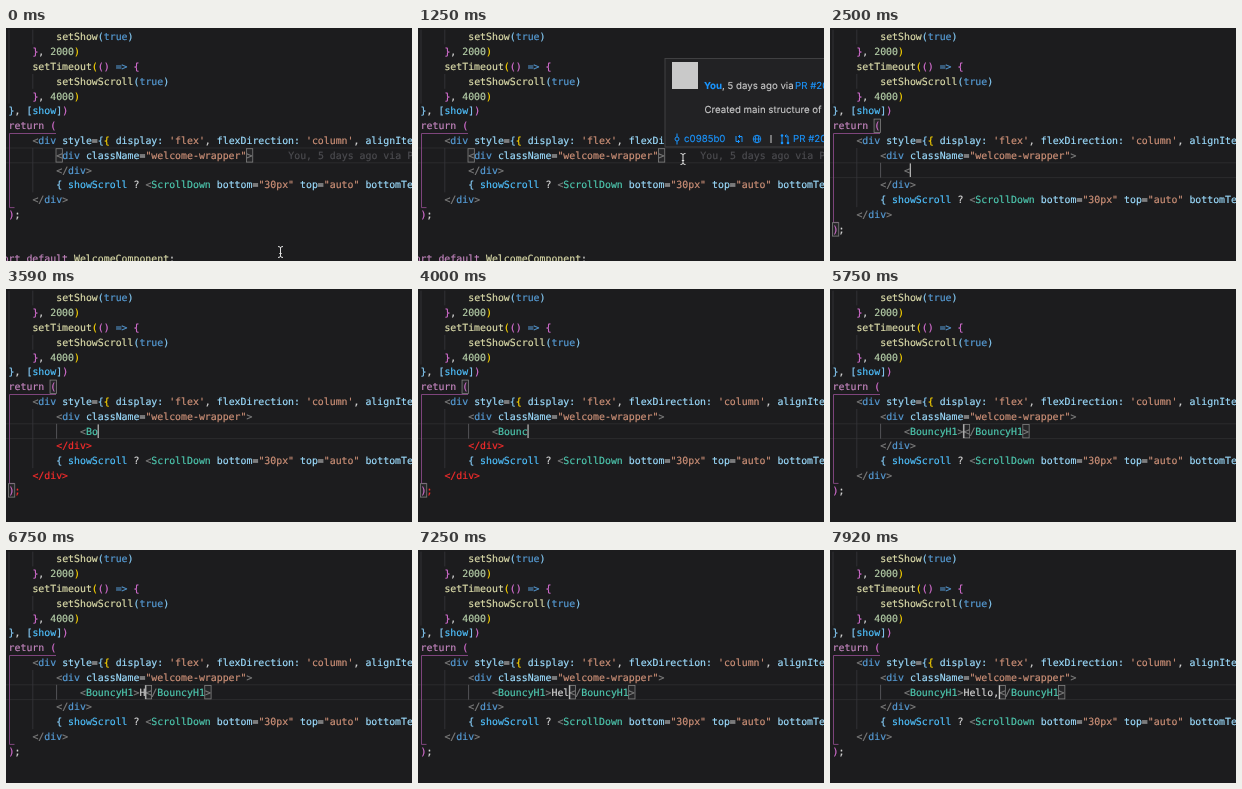
Recreate the animation shown at these times as an HTML page. Size 406 by 233 pixels, loop 8 s.

```html
<!DOCTYPE html>
<html lang="en">
<head>
<meta charset="utf-8">
<title>Editor</title>
<style>
  html, body { margin: 0; width: 100%; height: 100%; overflow: hidden; background: #1c1c1e; }
  svg { display: block; width: 100vw; height: 100vh; }
  text {
    white-space: pre; text-rendering: geometricPrecision; font: 9.88px "DejaVu Sans Mono", monospace;
    fill: currentColor; stroke: currentColor; stroke-width: .18px;
  }
  tspan { fill: currentColor; stroke: currentColor; }
  .ui text { font: 9.7px Inter, sans-serif; stroke-width: .1px; }
  .bold, .ui .bold { font-weight: 700; }
</style>
</head>
<body>
<svg viewBox="0 0 406 233" preserveAspectRatio="none">
  <g id="scene"></g>
  <path id="mouse" d="M-2.5-5.5Q0-5.5 0-4Q0-5.5 2.5-5.5M0-4V4M-2.5 5.5Q0 5.5 0 4Q0 5.5 2.5 5.5M-1.2 1.5H1.2" fill="none" stroke="#e0e0e0"/>
</svg>
<script>
const LOOP = 8000, CHAR = 5.95, ROW = 14.8, LEFT = 2.6;
const COLORS = {
  y: '#dcdcaa', b: '#569cd6', n: '#b5cea8', v: '#9cdcfe', s: '#87cefa', o: '#da70d6', g: '#ffd700',
  w: '#d4d4d4', k: '#c586c0', t: '#808080', c: '#4ec9b0', q: '#ce9178', r: '#f82c2c', d: '#4c4c50',
  i: '#4fc1ff',
};

// Each step: start time, text typed on the new line.
const TYPING = [
  [1750, ''], [2250, '<'], [3170, '<B'], [3420, '<Bo'], [3670, '<Bou'], [3840, '<Boun'],
  [4000, '<Bounc'], [4170, '<Bouncy'], [5090, '<BouncyH1'], [5590, '<BouncyH1>'],
  [6500, '<BouncyH1>H'], [7000, '<BouncyH1>He'], [7170, '<BouncyH1>Hel'],
  [7340, '<BouncyH1>Hell'], [7590, '<BouncyH1>Hello'], [7840, '<BouncyH1>Hello,'],
];
const HOVER = [1000, 1670], SUGGEST = [4250, 5090], BROKEN = [3170, 5590], SQUIGGLES = [4420, 5590];
const MOUSE = [[200, 274.5, 224], [750, 265, 131]];

const within = (t, [from, to]) => t >= from && t < to;
const xAt = col => LEFT + col * CHAR;
const yAt = row => 9 + row * ROW;
const esc = s => s.replace(/&/g, '&amp;').replace(/</g, '&lt;');
const rect = (x, y, w, h, attrs) => `<rect x="${x}" y="${y}" width="${w}" height="${h}" ${attrs}/>`;
const path = (d, color, width = 1) => `<path d="${d}" fill="none" stroke="${color}" stroke-width="${width}"/>`;
const label = (x, y, s, color, attrs = '') => `<text x="${x}" y="${y}" color="${color}" ${attrs}>${esc(s)}</text>`;

// Tokens start with a colour key.
function code(row, col, tokens) {
  const spans = tokens.map(k => `<tspan color="${COLORS[k[0]]}">${esc(k.slice(1))}</tspan>`);
  return `<text x="${xAt(col)}" y="${yAt(row) + 3.4}">${spans.join('')}</text>`;
}
const bracketBox = (row, col) =>
  rect(xAt(col) - .2, yAt(row) - 6.7, CHAR + .4, 13.4, 'fill="#888" fill-opacity=".08" stroke="#808080" stroke-width=".8"');
const guide = (col, from, to, color = '#38383b') =>
  path(`M${xAt(col) + .4} ${yAt(from) - ROW / 2}V${yAt(to) + ROW / 2}`, color, .8);

function squiggle(row, col, count) {
  const end = xAt(col + count);
  let x = xAt(col), d = `M${x} ${yAt(row) + 7}`;
  for (let up = true; x < end; up = !up) d += `L${x += 1.7} ${yAt(row) + (up ? 5.2 : 7)}`;
  return path(d, '#f14c4c', .9);
}

const closeTag = bad => bad ? ['r</div>'] : ['t</', 'bdiv', 't>'];

function typedTokens(text) {
  const [, open, name, close, rest] = text.match(/^(<?)(\w*)(>?)(.*)$/);
  const tokens = ['t' + open, 'c' + name, 't' + close, 'w' + rest];
  return close ? [...tokens, 't</', 'cBouncyH1', 't>'] : tokens;
}

function hoverCard() {
  const blue = '#1a95ff', grey = '#cccccc';
  return `<g class="ui">` +
    rect(247, 30.5, 170, 88.5, 'fill="#222224" stroke="#404042"') +
    rect(254, 34, 26, 27, 'fill="#c9c9c9"') +
    label(286, 61, 'You', blue, 'class="bold"') +
    label(304, 61, ', 5 days ago via', grey) +
    label(377, 61, 'PR #207', blue) +
    label(286.5, 85, 'Created main structure of the', grey) +
    path('M259 105.5V109M259 113V116.5', blue) +
    `<circle cx="259" cy="111" r="2" fill="none" stroke="${blue}"/>` +
    label(266, 114.2, 'c0985b0', blue) +
    path('M318 108V113.5H321.5M320 112L321.5 113.5L320 115M324 114V108.5H320.5M322 107L320.5 108.5L322 110', blue) +
    `<g fill="none" stroke="${blue}" stroke-width=".9"><circle cx="339" cy="111" r="3.8"/><ellipse cx="339" cy="111" rx="1.7" ry="3.8"/></g>` +
    path('M335.2 111H342.8', blue, .9) +
    path('M353 107V115', grey) +
    path('M364 108V115M370 115V108H367M368.5 106.5L367 108L368.5 109.5', blue) +
    `<g fill="${blue}"><circle cx="364" cy="107.5" r="1.3"/><circle cx="364" cy="115" r="1.3"/><circle cx="370" cy="115" r="1.3"/></g>` +
    label(375, 114.2, 'PR #207', blue) + '</g>';
}

function suggestions() {
  const item = (y, name) =>
    path(`M121 ${y - 4}H119V${y + 4}H121M128 ${y - 4}H130V${y + 4}H128M122.5 ${y + 2.5}L126.5 ${y - 2.5}`, '#75beff', .9) +
    `<circle cx="124.5" cy="${y}" r="2.2" fill="none" stroke="#75beff" stroke-width=".9"/>` +
    `<text x="134" y="${y + 3.4}"><tspan color="#18a3ff" class="bold">Bouncy</tspan><tspan color="#d4d4d4">${name}</tspan></text>`;
  return rect(116.5, 150, 300, 31, 'fill="#222224" stroke="#404042"') +
    rect(117, 150.5, 300, 15, 'fill="#062f4a"') +
    item(158, 'H1') + item(172.5, 'H2') +
    label(232, 161.4, 'const BouncyH1: StyledComponent', '#a9adb2');
}

function sourceLines(open, typed, bad) {
  const shift = open ? 1 : 0;
  return [
    code(0, 8, ['ysetShow', 's(', 'btrue', 's)']),
    code(1, 4, ['o}', 'w, ', 'n2000', 'g)']),
    code(2, 4, ['ysetTimeout', 'g(', 'o()', 'b =>', 'o {']),
    code(3, 8, ['ysetShowScroll', 's(', 'btrue', 's)']),
    code(4, 4, ['o}', 'w, ', 'n4000', 'g)']),
    code(5, 0, ['s}', 'w, ', 's[', 'ishow', 's]', 'o)']),
    code(6, 0, ['kreturn ', 'o(']),
    code(7, 4, ['t<', 'bdiv', 'v style', 'w=', 's{', 'g{', 'v display:', "q 'flex'", 'w,', 'v flexDirection:',
      "q 'column'", 'w,', 'v alignItems:', "q 'center'"]),
    code(8, 8, ['t<', 'bdiv', 'v className', 'w=', 'q"welcome-wrapper"', 't>']),
    open ? code(9, 12, typedTokens(typed)) : '',
    code(9 + shift, 8, closeTag(bad)),
    code(10 + shift, 8, ['s{', 'i showScroll', 'w ? ', 't<', 'cScrollDown', 'v bottom', 'w=', 'q"30px"', 'v top', 'w=',
      'q"auto"', 'v bottomText', 'w=']),
    code(11 + shift, 4, closeTag(bad)),
    code(12 + shift, 0, ['o)', bad ? 'r;' : 'w;']),
    code(15 + shift, -4, ['kexport default ', 'yWelcomeComponent', 'w;']),
  ];
}

function draw(t) {
  const step = TYPING.filter(([at]) => at <= t).pop();
  const open = !!step, typed = open ? step[1] : '';
  const active = open ? 9 : 8, last = active + 4, caretCol = 12 + typed.length;
  const out = [
    rect(-2, yAt(active) - ROW / 2, 412, ROW, 'fill="none" stroke="#2b2b2d"'),
    guide(0, 0, 4), guide(4, 0, 0), guide(4, 3, 3), guide(4, 8, last - 2),
    open ? guide(8, 9, 9, '#626266') : '',
    path(`M50 105.5H${LEFT + .9}V${yAt(last) - 7}H8.5`, '#8a4a87', .9),
    ...sourceLines(open, typed, within(t, BROKEN)),
  ];
  if (!open) {
    out.push(bracketBox(8, 8), bracketBox(8, 40), code(8, 47, ['dYou, 5 days ago via PR #207']));
  } else {
    if (typed.includes('>')) out.push(bracketBox(9, caretCol), bracketBox(9, caretCol + 10));
    else out.push(bracketBox(6, 7), bracketBox(last, 0));
    out.push(rect(xAt(caretCol) - .2, yAt(9) - 6.8, 1.1, 13.6, 'fill="#c8c8c8"'));
  }
  if (within(t, SQUIGGLES)) {
    out.push(squiggle(7, 5, 3), squiggle(9, 13, typed.length - 1), squiggle(10, 8, 2), squiggle(10, 13, 1), squiggle(last, 1, 1));
  }
  if (within(t, HOVER)) out.push(hoverCard());
  if (within(t, SUGGEST)) out.push(suggestions());
  return out.join('');
}

const sceneEl = document.getElementById('scene'), mouseEl = document.getElementById('mouse');
const cuts = [...TYPING.map(s => s[0]), ...HOVER, ...SUGGEST, ...BROKEN, ...SQUIGGLES];
const start = performance.now();
let shown = -1;

function frame() {
  const t = (performance.now() - start) % LOOP;
  const key = Math.max(0, ...cuts.filter(c => c <= t));
  if (key !== shown) {
    sceneEl.innerHTML = draw(key);
    shown = key;
  }
  const [[t0, x0, y0], [t1, x1, y1]] = MOUSE;
  const p = Math.min(1, Math.max(0, (t - t0) / (t1 - t0)));
  const ease = p * p * (3 - 2 * p);
  mouseEl.setAttribute('transform', `translate(${x0 + (x1 - x0) * ease} ${y0 + (y1 - y0) * ease})`);
  mouseEl.style.display = t < TYPING[0][0] ? '' : 'none';
  requestAnimationFrame(frame);
}
frame();
</script>
</body>
</html>
```
